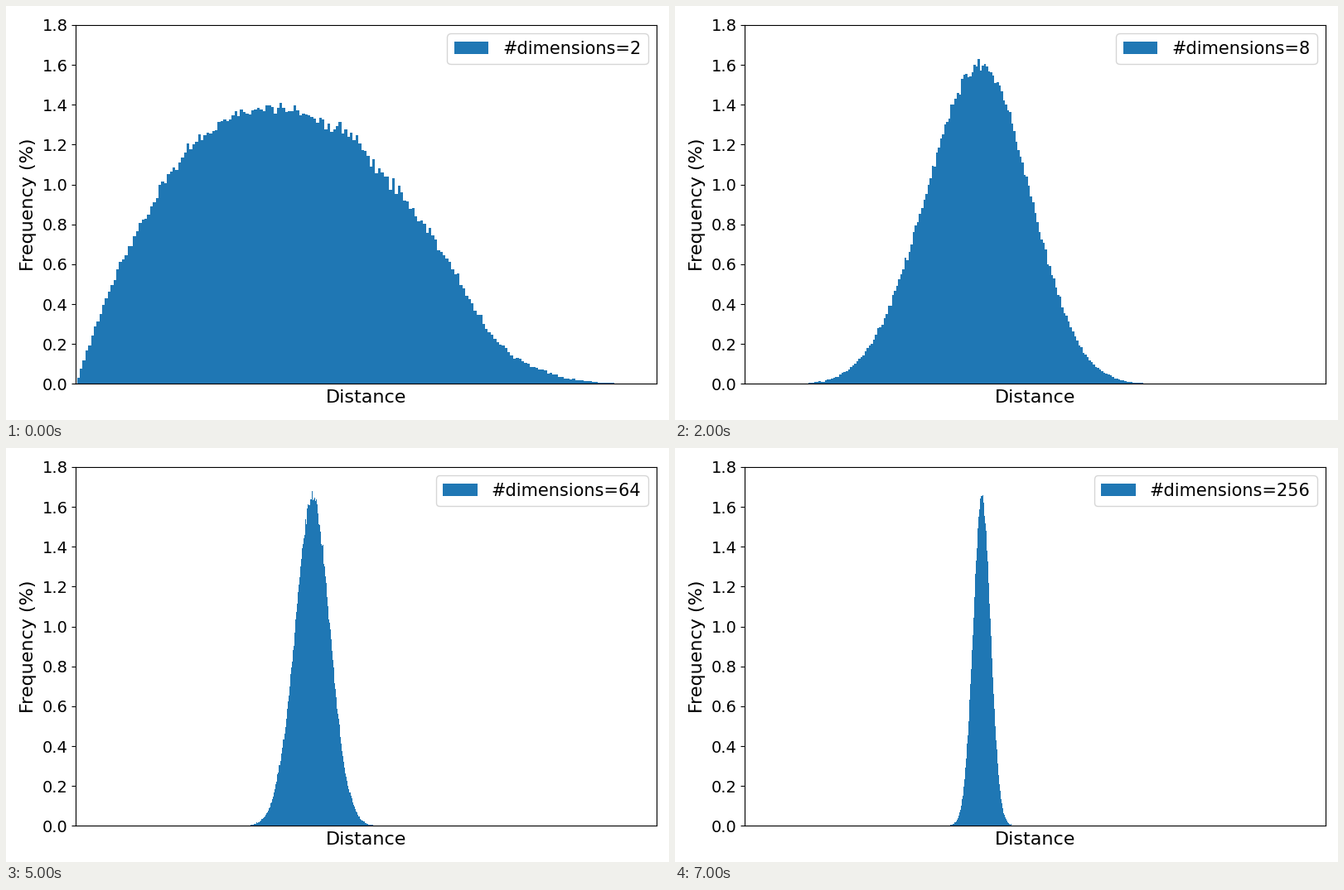
Animation of 800x500 px, one loop 8 s. Source, as a matplotlib script:

```python
import numpy as np
import matplotlib.pyplot as plt
from matplotlib.animation import FuncAnimation

WIDTH, HEIGHT = 800, 500
DIMS = [2 ** k for k in range(1, 9)]
PAIRS = 499500
BINS = 200

rng = np.random.default_rng(7)


def distances(dim):
    """Distances between random pairs of points in the unit hypercube."""
    square = np.zeros(PAIRS)
    for _ in range(dim):
        a = rng.random(PAIRS, dtype=np.float32)
        b = rng.random(PAIRS, dtype=np.float32)
        square += (a - b) ** 2
    return np.sqrt(square)


histograms = [np.histogram(distances(dim), bins=BINS, density=True)
              for dim in DIMS]

plt.rcParams["font.family"] = "DejaVu Sans"
fig, ax = plt.subplots(figsize=(WIDTH / 100, HEIGHT / 100), dpi=100)
fig.subplots_adjust(left=84.4 / WIDTH, right=785 / WIDTH,
                    bottom=43.6 / HEIGHT, top=477 / HEIGHT)


def draw(frame):
    dim = DIMS[frame]
    density, edges = histograms[frame]
    ax.clear()
    ax.bar(edges[:-1], density, width=np.diff(edges), align="edge",
           color="#1f77b4", label=f"#dimensions={dim}")
    # The longest possible distance is the cube's diagonal.
    ax.set_xlim(0, np.sqrt(dim))
    ax.set_ylim(0, 1.8)
    ax.set_xticks([])
    ax.set_yticks(np.arange(10) * 0.2)
    ax.tick_params(labelsize=14)
    ax.set_xlabel("Distance", fontsize=16, labelpad=5)
    ax.set_ylabel("Frequency (%)", fontsize=16, labelpad=5)
    ax.legend(loc="upper right", fontsize=15)


anim = FuncAnimation(fig, draw, frames=len(DIMS), interval=1000,
                     repeat=True, repeat_delay=0, blit=False)
plt.show()
```
